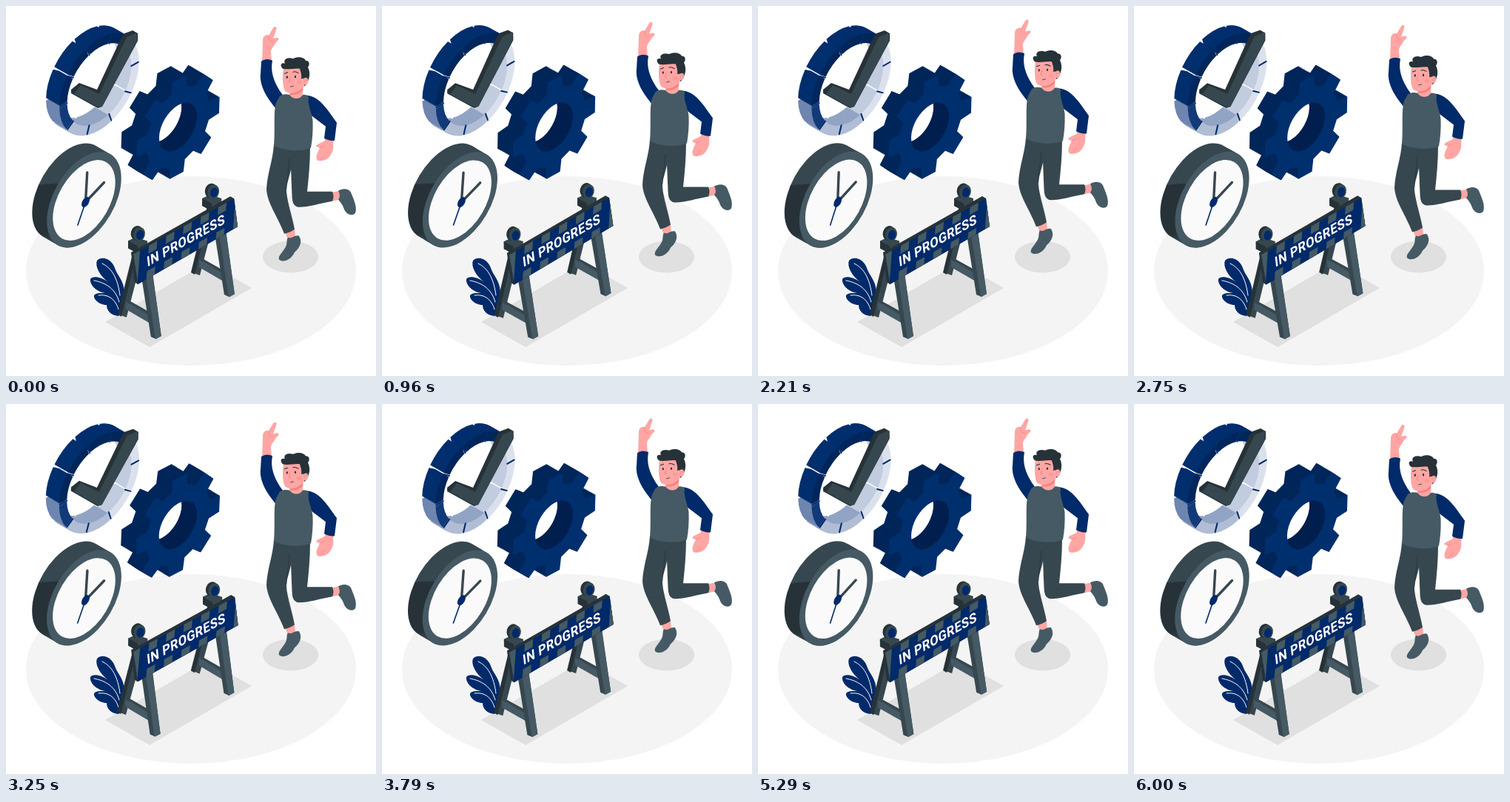
Recreate the animation shown at these times as an HTML page with a canvas. Size 500 px wide and 500 px high, loop 6040 ms.

```html
<!DOCTYPE html>
<html lang="en">
<head>
<meta charset="utf-8">
<title>In progress</title>
<style>
  html, body { margin: 0; width: 100%; height: 100%; overflow: hidden; background: #fff; }
  canvas { display: block; width: 500px; height: 500px; }
</style>
</head>
<body>
<canvas id="stage"></canvas>
<script>
const canvas = document.getElementById('stage');
const ctx = canvas.getContext('2d');
const ratio = window.devicePixelRatio || 1;
canvas.width = canvas.height = 500 * ratio;

const LOOP = 6040, LEAD = 40;
const NAVY = '#012a6a', BRIGHT = '#002f6e', DUSK = '#00265a', DEEP = '#001e4c',
      SLATE = '#455a64', STEEL = '#37474f', COAL = '#263238',
      SKIN = '#ffa6a4', BLUSH = '#f5827f';
const RAD = Math.PI / 180;

function fill(d, color) {
  ctx.fillStyle = color;
  ctx.fill(new Path2D(d));
}

function line(d, color, width) {
  ctx.strokeStyle = color;
  ctx.lineWidth = width;
  ctx.lineCap = ctx.lineJoin = 'round';
  ctx.stroke(new Path2D(d));
}

function oval(x, y, rx, ry, color, tilt = 0) {
  ctx.fillStyle = color;
  ctx.beginPath();
  ctx.ellipse(x, y, rx, ry, tilt, 0, 7);
  ctx.fill();
}

// Runs draw() in the plane of the upright isometric wall.
function iso(x, y, draw) {
  ctx.save();
  ctx.transform(0.866, -0.5, 0, 1, x, y);
  draw();
  ctx.restore();
}

// Repeats draw(layer) from the back to the front of a slab.
function slab(x, y, depth, draw) {
  for (let k = depth; k >= 0; k--) iso(x - 0.866 * k, y - 0.5 * k, () => draw(k));
}

function spin(x, y, deg, draw) {
  ctx.save();
  ctx.translate(x, y);
  ctx.rotate(deg * RAD);
  ctx.translate(-x, -y);
  draw();
  ctx.restore();
}

function disc(r, color) {
  oval(0, 0, r, r, color);
}

// ---- floating objects ----

// Front and side colour of one ring segment.
function segmentColors(i) {
  if (i === 4) return ['#123a78', '#6f86b0'];
  if (i > 4 && i < 9) return [DUSK, BRIGHT];
  if (i === 2 || i === 3) return ['#b0bdd5', '#92a4c4'];
  return ['#dbe1ec', '#c2ccdf'];
}

function ring() {
  slab(126, 106, 21, k => {
    for (let i = 0; i < 10; i++) {
      const from = (1.5 + i * 36) * RAD, to = from + 33 * RAD;
      ctx.fillStyle = segmentColors(i)[k ? 1 : 0];
      ctx.beginPath();
      ctx.arc(0, 0, 62, from, to);
      ctx.arc(0, 0, 50, to, from, true);
      ctx.fill();
    }
  });
  for (let i = 0; i < 10; i++) {
    const a = i * 36 * RAD;
    const at = r => `${126 + 0.866 * r * Math.cos(a)} ${106 + r * (Math.sin(a) - 0.5 * Math.cos(a))}`;
    line(`M${at(50)}L${at(61)}`, NAVY, 2);
  }
  fill('M156 42L160 37L171 33L178 37V47L130 136L124 138L88 118V113L99 104L123 113Z', COAL);
  fill('M163 42L177 36V47L130 136L125 137L92 119L101 107L126 119Z', STEEL);
}

function gear() {
  slab(232.5, 163.5, 24, k => {
    ctx.fillStyle = k ? DUSK : BRIGHT;
    ctx.beginPath();
    for (let i = 0; i < 8; i++) {
      for (const [r, off] of [[50, -14.5], [65.3, -9.5], [65.3, 9.5], [50, 14.5]]) {
        const a = (i * 45 + off + 2) * RAD;
        ctx.lineTo(r * Math.cos(a), r * Math.sin(a));
      }
    }
    ctx.closePath();
    ctx.arc(0, 0, 29.5, 0, 2 * Math.PI, true);
    ctx.fill('evenodd');
    if (!k) return;
    ctx.strokeStyle = DEEP;
    ctx.lineWidth = 4;
    ctx.beginPath();
    ctx.arc(0, 0, 31.5, 0, 7);
    ctx.stroke();
  });
}

function clock() {
  const shade = ctx.createLinearGradient(40, 232, 46, 320);
  [[0, STEEL], [0.1, STEEL], [0.12, COAL], [0.86, COAL], [1, STEEL]]
    .forEach(([at, color]) => shade.addColorStop(at, color));
  // The side is one hull so that its shading stays fixed to the body.
  const hull = new Path2D();
  for (let k = 23; k > 0; k--) {
    const part = new Path2D();
    part.arc(0, 0, 58, 0, 7);
    hull.addPath(part, new DOMMatrix([0.866, -0.5, 0, 1, 105.5 - 0.866 * k, 261.8 - 0.5 * k]));
  }
  ctx.fillStyle = shade;
  ctx.fill(hull);
  iso(105.5, 261.8, () => disc(58, SLATE));
  iso(105.5, 262.5, () => disc(48.7, '#fafafa'));
  line('M107.5 265L109.7 225', STEEL, 3.4);
  line('M107.5 265L132.5 238.5', STEEL, 3.4);
  line('M107.5 265L97 296', NAVY, 1.6);
  iso(107.5, 265, () => disc(6.3, NAVY));
}

// ---- barrier ----

function lamp(x, y) {
  fill(`M${x - 14} ${y + 10}L${x - 4} ${y + 5}L${x + 12} ${y + 10}V${y + 20}L${x - 1} ${y + 27}L${x - 14} ${y + 20}Z`, STEEL);
  fill(`M${x - 14} ${y + 10}L${x - 1} ${y + 17}V${y + 27}L${x - 14} ${y + 20}Z`, COAL);
  oval(x - 2, y - 0.5, 8.3, 10, COAL, 0.25);
  oval(x + 1, y + 1, 7.8, 9.8, STEEL, 0.25);
  oval(x + 2, y + 2, 5, 6.7, NAVY, 0.25);
}

function trestle(x, y) {
  ctx.save();
  ctx.translate(x, y);
  fill('M-3 15L7 20L-17 113L-28 109Z', STEEL);
  fill('M-6 15L-1 17L-24 112L-29 109Z', COAL);
  fill('M-18 92L22 114V125L-18 102Z', SLATE);
  fill('M-18 92L-14 90L22 110V115Z', STEEL);
  fill('M4 18L13 16L30 138L23 142L16 139L-2 26Z', STEEL);
  fill('M4 24L13 20L30 138L22 142Z', SLATE);
  ctx.restore();
}

function board() {
  fill('M169 333L303 257L308 260L313 298L178 376L174 373Z', COAL);
  const face = new Path2D('M172 335.5L308 260L313 298L178.5 376Z');
  ctx.save();
  ctx.fillStyle = NAVY;
  ctx.fill(face);
  ctx.clip(face);
  ctx.transform(0.866, -0.485, 0.15, 0.99, 172, 335.5);
  ctx.fillStyle = SLATE;
  for (let x = -14; x < 175; x += 27) {
    ctx.beginPath();
    ctx.moveTo(x + 13, -6);
    ctx.lineTo(x + 26, -6);
    ctx.lineTo(x + 12, 46);
    ctx.lineTo(x - 1, 46);
    ctx.fill();
  }
  ctx.fillStyle = NAVY;
  ctx.fillRect(15, 10, 132, 21);
  ctx.restore();

  ctx.save();
  ctx.transform(0.866, -0.485, 0.11, 0.99, 191, 352.5);
  ctx.fillStyle = '#fff';
  ctx.font = 'bold 18.5px Roboto, Inter, sans-serif';
  ctx.letterSpacing = '0.4px';
  ctx.fillText('IN PROGRESS', 0, 0);
  ctx.restore();
}

function barrier() {
  trestle(279, 251);
  lamp(279, 250);
  trestle(180, 308);
  lamp(179, 307.5);
  board();
}

function plant() {
  fill('M152 419C141 418 136 411 136 404C127 404 118 397 119 391C122 387 129 388 134 388C122 386 113 377 114 369C117 364 129 366 138 373C126 364 120 351 123 344C130 337 143 342 147 354C150 364 159 370 160 386L158 412Z', NAVY);
  line('M130 348C143 354 151 368 154 391', '#fff', 1);
  line('M119 371C135 374 148 382 153 400', '#fff', 1);
  line('M125 391C138 389 148 396 152 410', '#fff', 1);
}

// ---- person ----

function legs() {
  fill('M440 251L452 249L454 260L441 263Z', SKIN);
  fill('M449 249C454 246 462 245 466 251C470 261 475 271 472 279C468 284 460 281 457 274C455 268 452 264 449 261C452 257 451 253 449 249Z', SLATE);
  fill('M384 190L411 189C411 211 409 231 407 250L441 250C443 254 443 259 441 263C424 266 409 271 396 271C385 270 387 258 386 245Z', STEEL);
  fill('M377 304L390 301L391 312L381 315Z', SKIN);
  fill('M381 312C386 315 390 308 396 310C401 318 397 326 390 332C386 341 376 347 369 342C367 336 376 331 379 322C380 318 379 315 381 312Z', SLATE);
  fill('M362 186L390 193C387 218 382 231 379 244C378 259 386 279 390 301C386 304 381 306 376 307C367 283 353 266 352 247C353 225 361 207 362 186Z', STEEL);
  line('M383 206C382 224 379 234 379 246', COAL, 0.8);
}

function arms() {
  fill('M346 77L347 46C347 40 352 37 355 39L361 29C363 26 367 27 365 32L361 43L367 42C370 43 368 46 365 48C362 54 358 57 358 61L359 76Z', SKIN);
  line('M355 40C354 44 356 47 360 47', BLUSH, 0.8);
  fill('M345 74C350 70 356 71 360 73C357 88 362 101 370 114L375 121L366 139C355 127 342 108 344 91Z', NAVY);
  fill('M431 177L443 179C441 187 444 192 440 198C437 206 429 210 421 208C417 203 422 196 424 191L419 189C420 185 428 184 431 181Z', SKIN);
  line('M424 191L430 188M425 207L431 201', BLUSH, 0.8);
  fill('M405 120C422 120 433 137 447 157L444 181C439 182 434 180 430 178L432 162L411 146Z', NAVY);
}

function head() {
  fill('M384 107L401 102L400 119C397 126 386 126 382 119Z', SKIN);
  fill('M383 116C390 117 396 114 400 108L400 113C395 119 388 120 383 119Z', BLUSH);
  fill('M374 83C372 95 373 109 376 114C383 120 395 116 400 109L407 103L408 95L400 80Z', SKIN);
  fill('M373 84C369 80 370 75 376 77C373 71 380 68 387 70.5C394 67 402 69 404 73C409 73 410 78 407 82C411 90 409 98 405 105L402 108C403 103 402 97 400 97L398 98C399 92 397 88 396 84C388 83 380 86 373 84Z', COAL);
  oval(403.5, 101, 3.8, 5, SKIN, 0.3);
  line('M402 102C402 99 405 98 406 100', BLUSH, 0.8);
  line('M375.5 90.5L379.5 89M387 88.5C390 87.5 392 88.5 394 90', COAL, 1.1);
  oval(378.8, 95.5, 1.1, 1.8, COAL);
  oval(390, 95, 1.1, 1.8, COAL);
  line('M383 95L381 102L383.5 102.5', BLUSH, 0.9);
  line('M383.5 108.5L387.5 107.5', COAL, 0.8);
  oval(395, 103, 3.3, 2.5, 'rgba(245,130,127,.35)');
}

function person() {
  legs();
  arms();
  fill('M370 121C377 117 382 119 386 120C392 124 398 121 402 119C405 119 408 120 409 122C407 132 413 142 414.5 154C415 168 414 180 412 191C397 197 376 195 362 188C364 164 361 143 365 130Z', SLATE);
  ctx.save();
  ctx.translate(1, 0);
  head();
  ctx.restore();
}

// ---- motion ----

// Linear sway: 0, +1 at a quarter, -1 at three quarters, back to 0.
function sway(ms, period) {
  const p = ms / period % 1;
  return p < 0.25 ? 4 * p : p < 0.75 ? 2 - 4 * p : 4 * p - 4;
}

function scene(ms) {
  const wind = sway(ms, 1500);
  const p = ms / 1500 % 1;
  const rise = 20 * Math.min(p, 1 - p);

  ctx.setTransform(ratio, 0, 0, ratio, 0, 0);
  ctx.fillStyle = '#fff';
  ctx.fillRect(0, 0, 500, 500);
  oval(250, 358, 223, 128, '#f4f4f4');
  fill('M134 427L194 461L332 381L272 347Z', '#e0e0e0');
  oval(384.5, 339, 37.5, 21.5, '#e0e0e0');

  spin(118, 101, wind, ring);
  spin(222, 157, wind, gear);
  spin(96, 256, sway(ms, 3000), clock);
  plant();
  spin(232, 345, wind, barrier);

  ctx.translate(0, 1.2 - rise);
  person();
}

const start = performance.now();
function frame() {
  scene((performance.now() - start) % LOOP + LEAD);
  requestAnimationFrame(frame);
}
frame();
</script>
</body>
</html>
```
